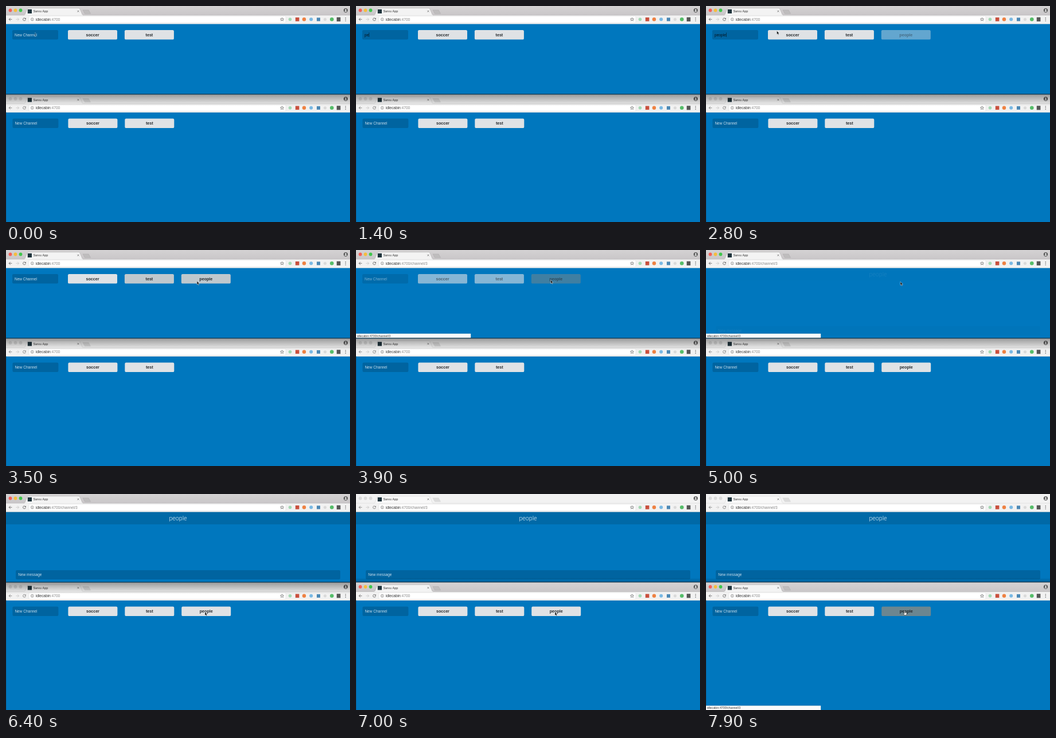
Recreate the animation shown at these times as an HTML page with a canvas. Size 600 by 377 pixels, loop 8 s.

```html
<!DOCTYPE html>
<html lang="en">
<head>
<meta charset="utf-8">
<title>Channels</title>
<style>
html, body { margin: 0; width: 100%; height: 100%; overflow: hidden; background: #0077be; }
canvas { display: block; width: 600px; height: 377px; }
</style>
</head>
<body>
<canvas id="stage"></canvas>
<script>
const W = 600, H = 377, LOOP = 8000, STEP = 100, SPLIT = 154.5;
const SANS = '"Liberation Sans", Arial, sans-serif';
const LIGHT = 'Roboto, "Open Sans", sans-serif';
const BLUE = '#0077be', SHADE = 'rgba(0,0,0,.16)';
const APP = 'Sarvu App', HOST = 'idlecabin', PORT = ':4700', PATH = '/channel/3';
const WORD = 'people';

// Main events in ms
const FOCUS = 600, TYPE = 1100, KEY = 170, ENTER = 2600, CLEAR = 2900;
const OPEN = 3800, READY = 4950, SWITCH = 6900, HOVER = 7400;

const canvas = document.getElementById('stage');
const c = canvas.getContext('2d');
const dpr = window.devicePixelRatio || 1;
canvas.width = W * dpr;
canvas.height = H * dpr;

const clamp = v => Math.max(0, Math.min(1, v));
const ramp = (t, a, b) => clamp((t - a) / (b - a));
const smooth = v => v * v * (3 - 2 * v);

// Interpolates keys of the form [time, value, ...]
function track(keys, t, ease = v => v) {
  if (t <= keys[0][0]) return keys[0].slice(1);
  for (let i = 1; i < keys.length; i++) {
    const a = keys[i - 1], b = keys[i];
    if (t <= b[0]) {
      const k = ease(ramp(t, a[0], b[0]));
      return a.slice(1).map((v, j) => v + (b[j + 1] - v) * k);
    }
  }
  return keys[keys.length - 1].slice(1);
}

function mix(a, b, k) {
  return `rgb(${a.map((v, i) => Math.round(v + (b[i] - v) * k)).join()})`;
}

function rect(x, y, w, h, color) {
  c.fillStyle = color;
  c.fillRect(x, y, w, h);
}

function round(x, y, w, h, r, color) {
  c.fillStyle = color;
  c.beginPath();
  c.roundRect(x, y, w, h, r);
  c.fill();
}

function dot(x, y, r, color) {
  c.fillStyle = color;
  c.beginPath();
  c.arc(x, y, r, 0, Math.PI * 2);
  c.fill();
}

function poly(points, fill, stroke, width = 0.6) {
  c.beginPath();
  points.forEach(([x, y]) => c.lineTo(x, y));
  c.closePath();
  if (fill) { c.fillStyle = fill; c.fill(); }
  if (stroke) { c.strokeStyle = stroke; c.lineWidth = width; c.stroke(); }
}

function line(points, color, width = 0.8) {
  c.strokeStyle = color;
  c.lineWidth = width;
  c.beginPath();
  points.forEach(([x, y]) => c.lineTo(x, y));
  c.stroke();
}

function text(str, x, y, size, color, weight = '', align = 'left', face = SANS) {
  c.font = `${weight} ${size}px ${face}`;
  c.textAlign = align;
  c.fillStyle = color;
  c.fillText(str, x, y);
  return c.measureText(str).width;
}

function fade(alpha, draw) {
  if (alpha <= 0) return;
  c.save();
  c.globalAlpha *= alpha;
  draw();
  c.restore();
}

function gradient(y, h, from, to) {
  const g = c.createLinearGradient(0, y, 0, y + h);
  g.addColorStop(0, from);
  g.addColorStop(1, to);
  rect(0, y, W, h, g);
}

function arrowIcon(x, dir, color) {
  line([[x - 2.6, 23.3], [x + 2.6, 23.3]], color);
  line([[x + dir * 0.1, 20.8], [x + dir * 2.6, 23.3], [x + dir * 0.1, 25.8]], color);
}

function chrome(active, path) {
  if (active) gradient(0, 16.5, '#d4d2d3', '#c9c6c8');
  else rect(0, 0, W, 16.5, '#f2f2f2');
  const lights = active ? ['#f4605a', '#f6bd3b', '#3fc64c'] : ['#dadada', '#dadada', '#dadada'];
  lights.forEach((color, i) => dot(7.5 + i * 9, 7.5, 2.9, color));

  const edge = active ? '#aaa8a9' : '#cfcfcf';
  rect(0, 16, W, 15.3, '#f2f2f2');
  rect(0, 15.8, W, 0.5, edge);
  poly([[31, 16.4], [33, 15], [37, 5], [39, 3.8], [127, 3.8], [129, 5], [133, 15], [135, 16.4]],
    active ? '#f3f3f3' : '#f8f8f8', edge, 0.5);
  rect(31.5, 15.6, 103, 1.2, '#f3f3f3');
  poly([[134, 7], [144, 7], [147.5, 13.3], [137.5, 13.3]], active ? '#bfbdbe' : '#dcdcdc', edge, 0.5);

  rect(37.8, 5.8, 7.2, 7.2, '#20343d');
  text(APP, 47.4, 11.3, 5.55, '#333');
  line([[124.4, 7.7], [127.4, 10.7]], '#666', 0.7);
  line([[127.4, 7.7], [124.4, 10.7]], '#666', 0.7);

  dot(592.5, 7.6, 3.6, '#555');
  dot(592.5, 6.5, 1.3, '#eee');
  c.fillStyle = '#eee';
  c.beginPath();
  c.arc(592.5, 10.1, 2, Math.PI, 0);
  c.fill();

  const ink = active ? '#5c5c5c' : '#777';
  arrowIcon(7.8, -1, ink);
  arrowIcon(20, 1, '#c6c6c6');
  c.strokeStyle = ink;
  c.lineWidth = 0.8;
  c.beginPath();
  c.arc(32, 23.3, 2.4, 0.2, 5.4);
  c.stroke();
  poly([[34.7, 20.4], [34.7, 23], [32.2, 23]], ink);

  round(40, 17.7, 448, 11.6, 1.5, '#fff');
  c.strokeStyle = '#d5d5d5';
  c.lineWidth = 0.4;
  c.stroke();
  c.strokeStyle = '#666';
  c.lineWidth = 0.6;
  c.beginPath();
  c.arc(45.8, 23.3, 2.5, 0, Math.PI * 2);
  c.stroke();
  rect(45.45, 22.8, 0.7, 2, '#555');
  rect(45.45, 21.6, 0.7, 0.7, '#555');
  const w = text(HOST, 51.7, 25.6, 6.6, '#333');
  text(PORT + path, 51.7 + w, 25.6, 6.6, '#858585');

  const star = [];
  for (let i = 0; i < 10; i++) {
    const a = -Math.PI / 2 + i * Math.PI / 5, r = i % 2 ? 1.35 : 3.2;
    star.push([481.5 + r * Math.cos(a), 23.5 + r * Math.sin(a)]);
  }
  poly(star, null, '#555', 0.65);

  dot(495.5, 23.3, 2.8, '#a5d9b4');
  rect(504.8, 20, 6.6, 6.6, '#c9503e');
  dot(520, 23.3, 3.2, '#ee8243');
  dot(532.2, 23.3, 3, '#7ab9e4');
  rect(542, 20.4, 6, 6, '#4b88b5');
  dot(556.5, 23.3, 2.6, '#dadada');
  dot(568.3, 23.3, 3.3, '#55bd69');
  rect(576.8, 19.7, 6.6, 7.2, '#555');
  for (const y of [20.7, 23.3, 25.9]) dot(592.3, y, 0.7, '#555');
  rect(0, 31, W, 0.4, '#c8d0d4');
}

function button(i, label, hover = 0) {
  const x = 108 + i * 98.9;
  round(x, 42, 86, 16.6, 2.2, mix([223, 226, 229], [108, 134, 144], hover));
  text(label, x + 43, 52.8, 7.1, '#24272b', 'bold', 'center');
}

function field(typed, caret) {
  round(11, 42, 80, 16.4, 2.2, SHADE);
  const w = typed ? text(typed, 15, 52.6, 6.6, '#06151f') : 0;
  if (!typed) text('New Channel', 15, 52.6, 6.5, '#cbdfed');
  if (caret) rect(15.2 + w, 46.4, 0.6, 7.6, '#06151f');
}

function status(bottom) {
  rect(0, bottom - 7.6, 200.3, 7.6, '#b9bfc3');
  rect(0, bottom - 7.2, 200, 7.2, '#fbfbfb');
  text(HOST + PORT + PATH, 1.5, bottom - 1.8, 5.3, '#333');
}

function spinner(t) {
  c.save();
  c.translate(300, 92.7);
  c.rotate((-17 + (t - 4500) * 0.18) * Math.PI / 180);
  for (let i = 0; i < 3; i++) {
    const s = 46 - i * 1.4;
    round(-s / 2, -s / 2, s, s, 5, 'rgba(255,255,255,.095)');
  }
  c.restore();
}

function channelPage() {
  rect(0, 31.2, W, 21.8, 'rgba(0,0,0,.12)');
  text(WORD, 300, 45.8, 10.6, '#e6f1f8', '300', 'center', LIGHT);
  round(17, 133, 566, 16, 2, SHADE);
  text('New message', 21.3, 143.4, 6.5, '#cbdfed');
}

function topWindow(t, active) {
  rect(0, 31, W, 123, BLUE);
  chrome(active, t >= OPEN ? PATH : '');

  fade(1 - ramp(t, OPEN, OPEN + 250), () => {
    const count = t < CLEAR ? Math.floor((t - TYPE) / KEY) + 1 : 0;
    const typing = t >= TYPE && t < ENTER;
    const blink = t >= FOCUS && t < 3450 && Math.floor((t - FOCUS) / 500) % 2 === 0;
    field(WORD.slice(0, Math.max(0, count)), typing || blink);
    button(0, 'soccer', track([[2800, 0], [3000, 0.35], [3300, 0]], t)[0]);
    button(1, 'test', track([[3080, 0], [3350, 0.55], [3500, 0.28], [3650, 0]], t)[0]);
    fade(ramp(t, ENTER, ENTER + 450), () =>
      button(2, WORD, track([[3400, 0], [3500, 0.28], [3750, 1]], t)[0]));
  });
  fade(ramp(t, OPEN + 150, OPEN + 450) * (1 - ramp(t, 4600, READY)), () => spinner(t));
  fade(ramp(t, READY, READY + 450), channelPage);
  if (t >= 3700) fade(1 - ramp(t, 5500, 5800), () => status(153.5));
  rect(0, 153.3, W, 1.2, '#12394f');
}

function bottomWindow(t, active) {
  c.save();
  c.translate(0, SPLIT);
  rect(0, 31, W, H - SPLIT - 31, BLUE);
  chrome(active, '');
  c.translate(0.4, 0);
  field('', false);
  button(0, 'soccer');
  button(1, 'test');
  fade(ramp(t, 3900, 4250), () => button(2, WORD, smooth(ramp(t, HOVER, HOVER + 400))));
  c.restore();
  rect(0, SPLIT + 31, 0.6, H, '#0a5c8e');
  fade(ramp(t, HOVER, HOVER + 200), () => status(H));
}

function pointer(t) {
  if (t >= TYPE && t < 2400) return;
  const [x, y] = track([
    [2400, 51, 50], [2800, 123.5, 43.5], [3500, 333, 54.3], [3700, 339.5, 52.3],
    [4600, 339.5, 52.3], [4900, 339, 55.4], [5500, 339, 55.4], [6200, 347, 206]
  ], t, t > 5500 ? smooth : undefined);
  const hand = (t >= 3600 && t < OPEN + 100) || t >= HOVER;
  c.save();
  c.translate(x, y);
  c.lineJoin = 'round';
  if (x < 91) {
    line([[-1.1, -3], [0, -2.5], [1.1, -3]], '#e4edf3', 0.6);
    line([[0, -2.5], [0, 2.5]], '#1d3a4d', 0.7);
    line([[-1.1, 3], [0, 2.5], [1.1, 3]], '#e4edf3', 0.6);
  } else if (hand) {
    poly([[-1, -1.6], [-0.3, -2.2], [0.4, -1.6], [0.4, 0.8], [2.8, 1.3], [3.2, 2], [2.7, 5.4],
      [-0.8, 5.4], [-2.8, 2.6], [-2.3, 1.8], [-1, 2.7]], '#fff', '#222', 0.6);
  } else {
    poly([[0, 0], [0, 6], [1.4, 4.8], [2.4, 7], [3.5, 6.5], [2.5, 4.4], [4.3, 4.3]],
      '#111', '#e8eef2', 0.5);
  }
  c.restore();
}

function draw(t) {
  c.setTransform(dpr, 0, 0, dpr, 0, 0);
  c.textBaseline = 'alphabetic';
  const topActive = t < SWITCH;
  if (topActive) {
    bottomWindow(t, false);
    gradient(SPLIT, 20, 'rgba(0,0,0,.36)', 'rgba(0,0,0,0)');
    topWindow(t, true);
  } else {
    topWindow(t, false);
    gradient(146, 8.5, 'rgba(0,0,0,0)', 'rgba(0,0,0,.2)');
    bottomWindow(t, true);
  }
  pointer(t);
}

const start = performance.now();
function tick() {
  const t = (performance.now() - start) % LOOP;
  draw(Math.floor(t / STEP) * STEP);
  requestAnimationFrame(tick);
}
tick();
</script>
</body>
</html>
```
